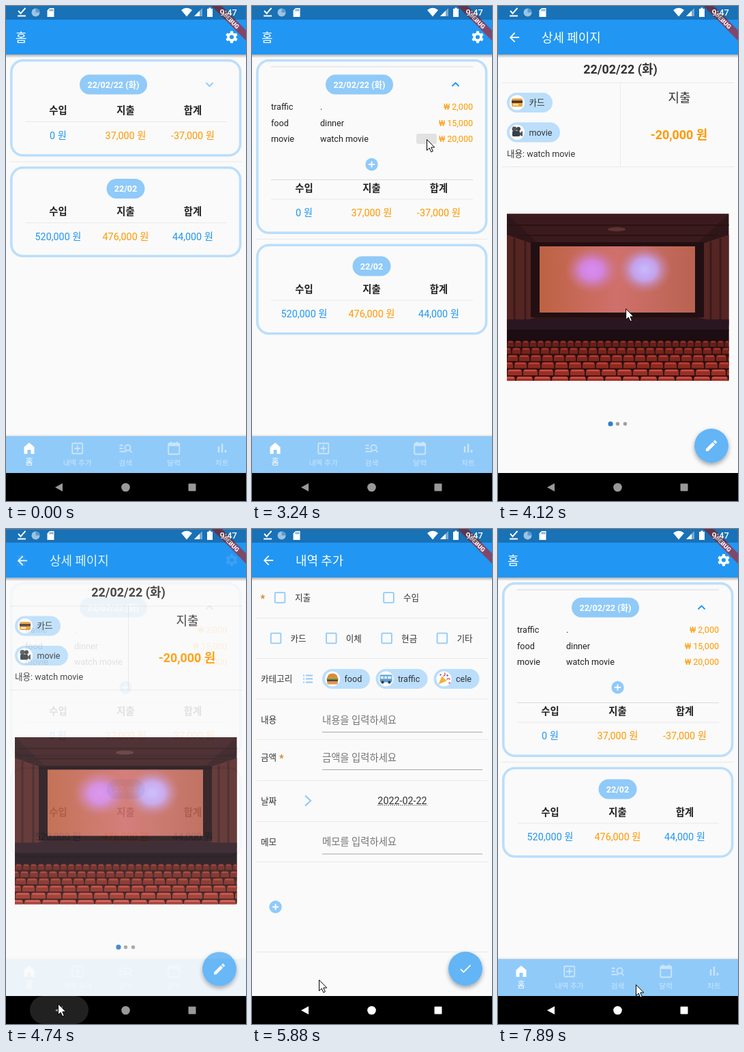
An HTML page that plays this animation: 352 px wide and 725 px high, repeating every 8000 ms.

```html
<!DOCTYPE html>
<html lang="ko">
<head>
<meta charset="utf-8">
<style>
  html, body { margin: 0; width: 100%; height: 100%; overflow: hidden; background: #fafafa; }
  svg { display: block; width: 100vw; height: 100vh; }
  text { font-family: Roboto, 'Noto Sans CJK KR', 'Noto Sans CJK', 'Noto Sans', sans-serif; white-space: pre; }
</style>
</head>
<body>
<svg id="stage" viewBox="0 0 352 725"></svg>
<script>
const BLUE = '#2196f3', LIGHT = '#90caf9', PALE = '#bbdefb', ORANGE = '#ff9800', INK = '#212121', PAPER = '#fafafa';
const MID = 'text-anchor="middle"', END = 'text-anchor="end"', BOLD = 'font-weight="700"';
const SMALL = 12.55, BODY = 14.34, TITLE = 17.9;

// ---- drawing helpers ----
const text = (x, y, s, size = SMALL, fill = '#333', extra = '') =>
  `<text x="${x}" y="${y}" font-size="${size}" fill="${fill}" ${extra}>${s}</text>`;
const rect = (x, y, w, h, fill, rx = 0, extra = '') =>
  `<rect x="${x}" y="${y}" width="${w}" height="${h}" rx="${rx}" fill="${fill}" ${extra}/>`;
const circle = (x, y, r, fill, extra = '') => `<circle cx="${x}" cy="${y}" r="${r}" fill="${fill}" ${extra}/>`;
const path = (d, fill, extra = '') => `<path d="${d}" fill="${fill}" ${extra}/>`;
const line = (d, color, width) => path(d, 'none', `stroke="${color}" stroke-width="${width}"`);
const rule = (y, x1 = 6, x2 = 346, color = '#e9e9e9') => rect(x1, y, x2 - x1, 1, color);
const group = (attrs, ...parts) => `<g ${attrs}>${parts.join('')}</g>`;
const at = (x, y, ...parts) => group(`transform="translate(${x} ${y})"`, ...parts);
const icon = (d, x, y, fill = '#fff') =>
  path(d, fill, `transform="translate(${x} ${y}) scale(.896) translate(-12 -12)"`);

const ICONS = {
  back: 'M20 11H7.83l5.59-5.59L12 4l-8 8 8 8 1.41-1.41L7.83 13H20z',
  edit: 'M3 17.25V21h3.75L17.81 9.94l-3.75-3.75zM20.71 7.04a1 1 0 0 0 0-1.41l-2.34-2.34a1 1 0 0 0-1.41 0l-1.83 1.83 3.75 3.75z',
  check: 'M9 16.17 4.83 12l-1.42 1.41L9 19 21 7l-1.41-1.41z'
};

const plusButton = (x, y) => circle(x, y, 9.2, LIGHT) + line(`M${x - 4.6} ${y}h9.2M${x} ${y - 4.6}v9.2`, '#fff', 1.8);
const checkbox = (x, y) => rect(x - 7.3, y - 7.3, 14.6, 14.6, 'none', 1, `stroke="${LIGHT}" stroke-width="1.8"`);
const fab = d => circle(313, 644, 25, '#64b5f6', 'filter="url(#lift)"') + icon(d, 313, 644);
const appBar = (...parts) => rect(0, 71, 352, 5, 'url(#shade)') + rect(0, 0, 352, 71, BLUE) + parts.join('');
const pageBar = title => appBar(icon(ICONS.back, 24, 46), text(64, 52.5, title, TITLE, '#fff', 'font-weight="500"'));

const pictures = {
  card: rect(-8, -6, 16, 12, '#e9a23b', 2) + rect(-8, -3, 16, 3.5, '#4e342e') + rect(-6, 2, 8, 2, '#fff3d6'),
  camera: circle(-4, -5, 3.5, '#555') + circle(2, -5, 3, '#444') + rect(-7, -2, 11, 8, '#37414a', 1.5) + path('M4 1L8-2V6L4 4Z', '#555'),
  burger: path('M-8-1Q-7-8 0-8T8-1Z', '#d98b3a') + rect(-8.5, -1, 17, 2.2, '#6a9a3a') + rect(-8, 1, 16, 3, '#6d3b24') + rect(-8, 4, 16, 4, '#dc9a4c', 2),
  bus: rect(-9, -6, 18, 11, '#5b9bd0', 2) + rect(-8, -4, 16, 4, '#d8eef9') + circle(-5, 5, 2, '#333') + circle(5, 5, 2, '#333') + line('M-3-4v4M2-4v4', '#5b9bd0', 1),
  party: path('M-8 8L-3-4L4 3Z', '#f0b23c') + line('M-1-4Q3-5 1-9M4 1Q7-2 9 1', '#d9534f', 1.5) + circle(5, -5, 1.4, '#4a90d9') + circle(-5, -6, 1.2, '#8e5bc0') + circle(8, 6, 1.2, '#e0589a')
};
const chip = (x, y, w, picture, label) =>
  at(x, y, rect(0, -14.5, w, 29, PALE, 14.5), circle(15, 0, 11, '#fff'), at(15, 0, pictures[picture]), text(32.5, 4.5, label));

// ---- home ----
const dateChip = (y, w, label) => rect(157.5 + 18 - w / 2, y - 14.5, w, 29, LIGHT, 14.5);
const columns = [76.5, 175.5, 274];
const totals = (y, values, colors) => columns.map((x, i) =>
  text(x, y + 5, ['수입', '지출', '합계'][i], BODY, INK, `${MID} ${BOLD}`) +
  text(x, y + 41.5, values[i] + ' 원', BODY, colors[i], MID)).join('') + rule(y + 16, 28, 324);
const badge = (x, y, w, label) =>
  rect(x - w / 2, y - 14.5, w, 29, LIGHT, 14.5) + text(x, y + 4.5, label, SMALL, '#fff', `${MID} ${BOLD}`);
const cardFrame = (y, h, id = '') =>
  rect(7.8, y + 1.8, 335.8, h - 3.6, 'none', 17, `${id} stroke="${PALE}" stroke-width="3.6"`);

const entries = [['traffic', '.', '2,000'], ['food', 'dinner', '15,000'], ['movie', 'watch movie', '20,000']]
  .map(([kind, note, sum], i) => {
    const y = 152 + i * 23.5;
    return text(28, y, kind, SMALL, INK) + text(100, y, note, SMALL, INK) + text(324, y, '₩ ' + sum, SMALL, ORANGE, END);
  }).join('');

const gear = at(331, 45.5, group('transform="scale(.9)" fill="none" stroke="#fff"',
  '<circle r="5.5" stroke-width="4.2"/>',
  '<circle r="8.2" stroke-width="3.4" pathLength="12" stroke-dasharray="1" transform="rotate(15)"/>'));

const tabIcons = [
  path('M-7.5-2L0-8.5L7.5-2V8H2.5V2H-2.5V8H-7.5Z', '#fff'),
  rect(-7.5, -7.5, 15, 15, 'none', 1, 'stroke="#fff" stroke-width="1.8"') + line('M-4.4 0h8.8M0-4.4v8.8', '#fff', 1.8),
  line('M-9-4.5h5M-9 0h5M-9 4.5h10M6 2.5L9 6', '#fff', 1.8) + circle(3, -1, 4.1, 'none', 'stroke="#fff" stroke-width="1.8"'),
  rect(-8, -7.5, 16, 16, 'none', 1.5, 'stroke="#fff" stroke-width="1.8"') + rect(-8, -8, 16, 4.5, '#fff') + line('M-4.5-10v3M4.5-10v3', '#fff', 1.8),
  line('M-5-3v9M0-7v13M5 2v4', '#fff', 2.4)
];
const tabs = ['홈', '내역 추가', '검색', '달력', '차트'].map((label, i) =>
  group(`opacity="${i ? .52 : 1}"`, at(34 + i * 70.75, 648, tabIcons[i], text(0, i ? 24.5 : 24, label, i ? 10.75 : 12.5, '#fff', MID)))).join('');

const home = rect(0, 0, 352, 684, PAPER) +
  cardFrame(78, 142.5, 'id="firstCard"') +
  group('id="tileLines"', rule(88.5, 28, 324, '#dadada')) +
  badge(157.5, 115, 99, '22/02/22 (화)') +
  line('M-5-2.5L0 2.5L5-2.5', LIGHT, 1.9).replace('<path', '<path id="chevron"') +
  group('clip-path="url(#reveal)"', group('id="entries"',
    rect(241, 187, 30, 15, '#e2e2e2', 3, 'id="pressed"'), entries, plusButton(175.5, 232))) +
  group('id="lower"',
    group('id="tileEnd"', rule(140.5, 28, 324, '#dadada')),
    totals(153, ['0', '37,000', '-37,000'], [BLUE, ORANGE, ORANGE]),
    rule(227.5), cardFrame(235, 133), badge(175.5, 267.5, 56, '22/02'),
    totals(301, ['520,000', '476,000', '44,000'], [BLUE, ORANGE, BLUE])) +
  appBar(text(14, 52.5, '홈', TITLE, '#fff', 'font-weight="500"'), gear) +
  rect(0, 627, 352, 3, 'url(#shadeUp)') + rect(0, 630, 352, 54, LIGHT) + tabs;

// ---- detail page ----
function seats() {
  let out = '';
  for (let row = 0; row < 6; row++) {
    const w = 11 + row * 3, y = 490 + row * 10.5;
    for (let x = 13 - (row % 2) * w / 2; x < 340; x += w)
      out += rect(x + 1, y, w - 2, 15, `hsl(5 62% ${25 + row * 3}%)`, 4) + rect(x + 2, y + 1, w - 4, 2, `hsl(5 58% ${37 + row * 4}%)`, 1) +
        rect(x, y + 9, w, 6, '#2b1012');
  }
  return out;
}
const cinema = group('clip-path="url(#photo)"',
  rect(13, 304, 326, 246, '#2e1619'),
  path('M13 304H339L289 350H61Z', '#3b1a1d'), line('M13 321H339M30 336H322', '#29130f', 2),
  `<ellipse cx="174" cy="327" rx="13" ry="3" fill="#5e3432"/>`,
  path('M13 335L56 350V456L13 468ZM339 335L294 350V456L339 468Z', '#552523'),
  path('M24 340V465M40 345V460M312 345V460M326 340V465', 'none', 'stroke="#3a1a1b" stroke-width="3"'),
  rect(48, 346, 254, 110, '#210f12'), rect(61, 352, 228, 97, 'url(#screen)'),
  `<ellipse cx="138" cy="387" rx="40" ry="34" fill="url(#pink)"/><ellipse cx="215" cy="386" rx="40" ry="36" fill="url(#lilac)"/>`,
  rect(13, 459, 326, 16, '#2a1620'), rect(13, 474, 326, 18, '#1b0d12'), seats());

const detail = rect(0, 0, 352, 684, PAPER) +
  text(179.5, 99, '22/02/22 (화)', TITLE, '#333', `${MID} ${BOLD}`) +
  rule(112) + rect(179, 113, 1, 122, '#e9e9e9') + rule(235) +
  chip(13, 141.5, 67, 'card', '카드') + chip(13, 185, 78, 'camera', 'movie') +
  text(13, 221, '내용: watch movie') +
  text(266, 140.5, '지출', TITLE, '#333', MID) + text(265.5, 195, '-20,000 원', TITLE, ORANGE, `${MID} ${BOLD}`) +
  cinema + circle(165, 612, 3.6, '#2f80cc') + circle(175.5, 612, 2.7, '#a0a0a0') + circle(186.5, 612, 2.7, '#a0a0a0') +
  pageBar('상세 페이지') + fab(ICONS.edit);

// ---- add page ----
const field = (y, label, hint) =>
  text(13, y + 4.5, label) + text(103, y + 5, hint, BODY, '#757575') + rect(103, y + 17.5, 235, 1, '#a8a8a8');
const star = (x, y) => text(x, y, '*', BODY, '#cf8520', BOLD);
const add = rect(0, 0, 352, 684, PAPER) +
  [130, 189, 248.5, 308, 368, 428, 487, 619].map(y => rule(y)).join('') +
  star(12.5, 107) + checkbox(41, 100.5) + text(63, 105, '지출') + checkbox(200.5, 100.5) + text(222, 105, '수입') +
  ['카드', '이체', '현금', '기타'].map((s, i) => checkbox(35 + i * 81.3, 160) + text(56.5 + i * 81.3, 164.5, s)).join('') +
  text(13, 224, '카테고리') +
  line('M75 214.5h2M79 214.5h10M75 219.5h2M79 219.5h10M75 224.5h2M79 224.5h10', LIGHT, 1.8) +
  chip(103, 219.5, 70, 'burger', 'food') + chip(181.5, 219.5, 76, 'bus', 'traffic') + chip(266.5, 219.5, 67, 'party', 'cele') +
  field(279.5, '내용', '내용을 입력하세요') + field(334.5, '금액', '금액을 입력하세요') + star(40, 341) +
  text(13, 402.5, '날짜') + line('M78 390.5L86 398L78 405.5', LIGHT, 2.2) +
  text(220.5, 403, '2022-02-22', BODY, '#333', MID) +
  path('M184 404.5H257', 'none', 'stroke="#777" stroke-dasharray="2 1"') +
  field(458, '메모', '메모를 입력하세요') + plusButton(34.5, 553.5) +
  pageBar('내역 추가') + fab(ICONS.check);

// ---- system bars ----
const banner = group('transform="translate(352 0) rotate(45)"',
  rect(-40, 25.1, 80, 10.7, '#b71c1c', 0, 'opacity=".63"'),
  text(0, 33.7, 'DEBUG', 9, '#fff', `${MID} font-weight="900"`));
const statusBar = rect(0, 0, 352, 20, '#000', 0, 'opacity=".25"') +
  line('M18 7L21.5 11L28.5 3M17 14.5H29', '#fff', 1.9) +
  circle(43.5, 9.5, 6, '#9cc4e2') + path('M43.5 3.5A6 6 0 0 1 49.5 9.5L43.5 9.5Z', '#5c9bcd') +
  path('M60.5 6.5L64 3H70.5V16H60.5Z', '#fff') + line('M64.5 4.5v3M66.5 4.5v3M68.5 4.5v3', '#1a73bb', 1) +
  path('M257 6Q265 -.5 273 6L265 15.5Z', '#fff') +
  path('M288 3V15H276Z', '#fff', 'opacity=".4"') + path('M284 7V15H276Z', '#fff') +
  path('M297.5 2.5h3V4h2.5V16h-8V4h2.5Z', '#fff') +
  text(313.5, 14, '9:47', 12.8, '#fff', 'font-weight="500"');
const keys = rect(0, 684, 352, 41, '#000') + rect(35, 684, 86, 41, '#212121', 20.5, 'id="ripple"') +
  group('id="keys"', path('M72 705L83 699V711Z', 'inherit').replace('fill="inherit"', ''), '<circle cx="175.5" cy="705" r="6.3"/>', '<rect x="267.5" y="699.5" width="11" height="11" rx="1"/>');
const pointer = path('M.5.5V16.5L4.2 13L6.8 18.8L9.3 17.7L6.8 12H11.7Z', '#fff', 'id="pointer" stroke="#000"');

const gradient = (kind, id, attrs, ...stops) => `<${kind}Gradient id="${id}" ${attrs}>` +
  stops.map(([offset, color, alpha = 1]) => `<stop offset="${offset}" stop-color="${color}" stop-opacity="${alpha}"/>`).join('') + `</${kind}Gradient>`;
const $ = id => document.getElementById(id);
$('stage').innerHTML = '<defs>' +
  gradient('linear', 'shade', 'x2="0" y2="1"', [0, '#000', .3], [1, '#000', 0]) +
  gradient('linear', 'shadeUp', 'x2="0" y2="1"', [0, '#000', 0], [1, '#000', .1]) +
  gradient('linear', 'screen', '', [0, '#bd6243'], [.5, '#d0706c'], [1, '#b96350']) +
  gradient('radial', 'pink', '', [0, '#d98cf2'], [.4, '#d184dc'], [1, '#d07890', 0]) +
  gradient('radial', 'lilac', '', [0, '#c6baff'], [.45, '#c4a0e8'], [1, '#c87888', 0]) +
  '<filter id="lift" x="-30%" y="-30%" width="160%" height="170%"><feDropShadow dx="0" dy="3" stdDeviation="3" flood-opacity=".35"/></filter>' +
  `<clipPath id="reveal">${rect(10, 129, 332, 12, '#000', 0, 'id="revealBox"')}</clipPath>` +
  `<clipPath id="photo">${rect(13, 304.5, 325.5, 244.5, '#000')}</clipPath>` +
  `<clipPath id="app">${rect(0, 0, 352, 684, '#000')}</clipPath></defs>` +
  group('clip-path="url(#app)"', home, group('id="detail"', detail), group('id="add"', add), banner, statusBar) + keys + pointer;

// ---- motion, keyed in steps of 125 ms ----
const LOOP = 8000, STEP = 125;
const pointerPath = [[6, 335, 693], [10, 340, 208], [13, 300, 120], [17, 300, 120], [21, 256, 188], [22, 256, 188],
  [23, 256, 195], [26, 256, 195], [27, 243, 262], [28, 227, 343], [30, 215, 380], [32, 215, 380], [37, 76, 695],
  [39, 76, 695], [42, 89, 674], [43, 98, 660], [54, 98, 660], [57, 76, 697], [59, 76, 697], [63, 202, 667]];
const detailIn = [[26, 0], [27, .47], [28, .89], [29, 1], [37, 1], [38, .93], [39, .51], [40, .1], [41, 0]];
const addIn = [[44, 0], [45, .3], [46, .72], [47, 1], [58, 1], [59, .6], [60, .18], [61, 0]];
const tileOpen = [[14, 0], [15, .3], [16, .92], [17, 1]];
const rippleIn = [[36, 0], [37, .6], [38, 1], [39, 1], [41, 0], [57, 0], [58, .8], [59, 1], [61, 0]];

function track(points, step) {
  const next = points.findIndex(p => p[0] > step);
  if (next === 0) return points[0].slice(1);
  if (next < 0) return points[points.length - 1].slice(1);
  const a = points[next - 1], b = points[next], k = (step - a[0]) / (b[0] - a[0]);
  return a.slice(1).map((v, i) => v + (b[i + 1] - v) * k);
}

function bezier(x1, y1, x2, y2) {
  const axis = (u, p, q) => 3 * (1 - u) ** 2 * u * p + 3 * (1 - u) * u * u * q + u ** 3;
  return x => {
    let low = 0, high = 1;
    for (let i = 0; i < 24; i++) {
      const u = (low + high) / 2;
      if (axis(u, x1, x2) < x) low = u; else high = u;
    }
    return axis(high, y1, y2);
  };
}
const easeIn = bezier(.42, 0, 1, 1), fastOutSlowIn = bezier(.4, 0, .2, 1);

const set = (id, attrs) => { for (const name in attrs) $(id).setAttribute(name, attrs[name]); };
const shift = (x, y) => `translate(${x} ${y})`;

function showPage(id, progress) {
  set(id, {
    opacity: easeIn(progress),
    transform: shift(0, 171 * (1 - fastOutSlowIn(progress))),
    visibility: progress ? 'visible' : 'hidden'
  });
}

function draw(now) {
  const step = Math.floor((now % LOOP + 15) / STEP);
  const [raw] = track(tileOpen, step), open = raw && easeIn(raw), grow = 113.5 * open;
  set('firstCard', { height: 138.9 + grow });
  set('revealBox', { height: grow + 12 * open });
  set('entries', { transform: shift(0, (grow - 113.5) / 2) });
  set('lower', { transform: shift(0, grow) });
  set('tileLines', { opacity: open });
  set('tileEnd', { opacity: open });
  set('chevron', { transform: `translate(298.5 115) rotate(${-180 * open})`, stroke: open > .5 ? BLUE : LIGHT });
  set('pressed', { opacity: step >= 25 && step <= 28 ? 1 : 0 });
  showPage('detail', track(detailIn, step)[0]);
  showPage('add', track(addIn, step)[0]);
  set('ripple', { opacity: track(rippleIn, step)[0] });
  set('keys', { fill: step < 40 ? '#999' : '#fff' });
  set('pointer', {
    transform: shift(...track(pointerPath, step)),
    visibility: step === 6 || step >= 10 ? 'visible' : 'hidden'
  });
}

const start = performance.now();
(function frame() {
  draw(performance.now() - start);
  requestAnimationFrame(frame);
})();
</script>
</body>
</html>
```
